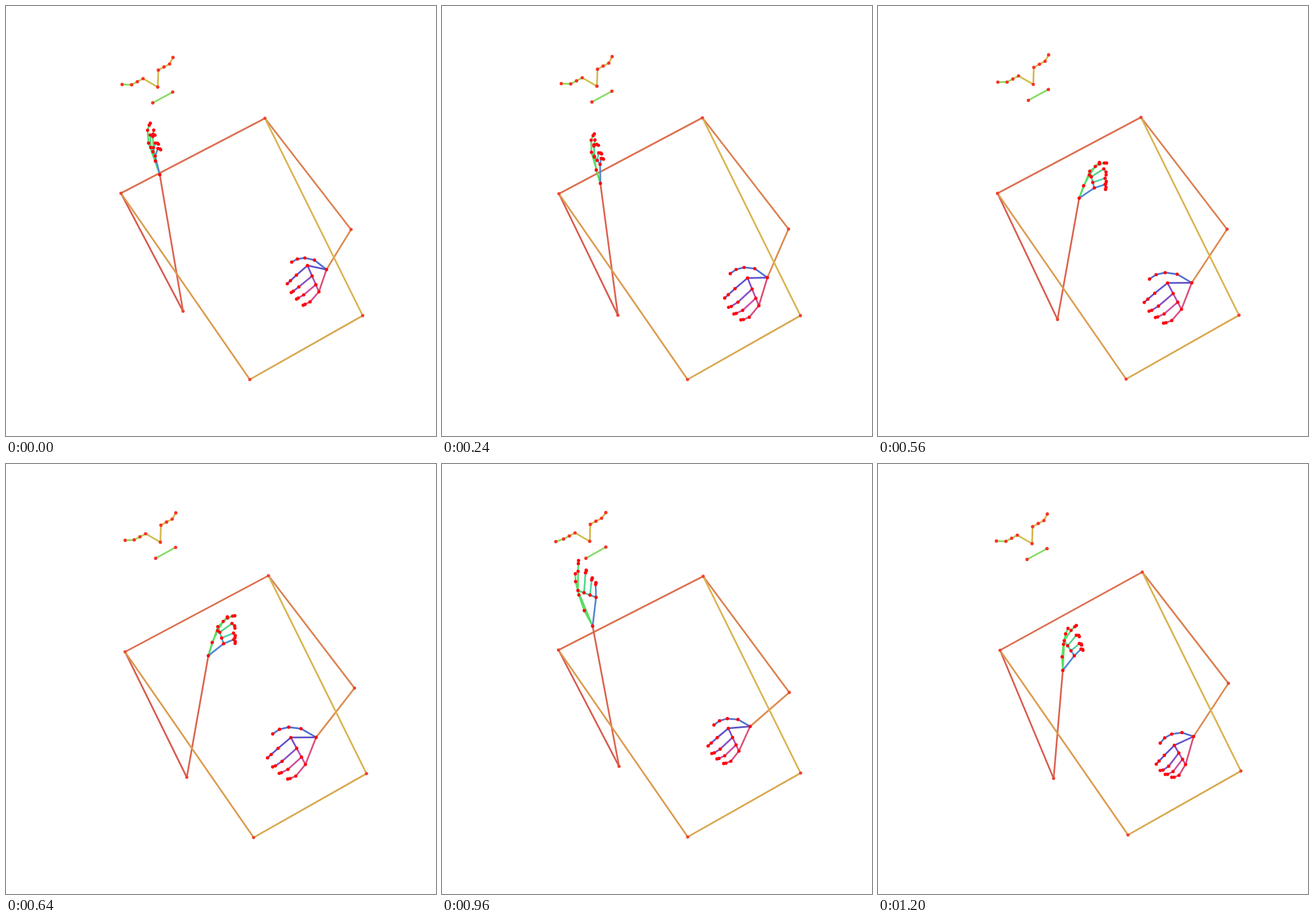
Write an HTML page with a canvas that moves like this. It is 748 by 748 pixels and loops after 1280 ms.

```html
<!DOCTYPE html>
<html lang="en">
<head>
<meta charset="utf-8">
<title>Skeleton in motion</title>
<style>
  html, body { margin: 0; width: 100%; height: 100%; overflow: hidden; background: #fff; }
  canvas { display: block; width: 748px; height: 748px; }
</style>
</head>
<body>
<canvas id="stage" width="748" height="748"></canvas>
<script>
const ctx = document.getElementById('stage').getContext('2d');
const STEP = 80, STEPS = 16;
const KEYS = [0, 3, 5, 8, 10, 12, 15]; // steps at which the key points are given

// Driving points; every other joint follows from these.
const chest = [[325.2, 260.5], [328.2, 260.5], [333, 258.5], [331.8, 260.5], [328.5, 260.5], [328.5, 259.5], [336, 256]];
const tilt = [27.5, 27.9, 27.7, 28, 27.8, 27, 28.8];
const nose = [[264, 141], [269.5, 139.5], [271.5, 137], [268.5, 136], [262, 135], [257, 134.5], [268, 138.5]];
const lean = [0, 0, 0, 0.25, 0.7, 1, 0];

const leftArm = {
  elbow: [[308, 531], [306, 538], [308.5, 542], [314.5, 545], [320.5, 535], [308, 526], [305.5, 547]],
  wrist: [[267.5, 293.5], [275.5, 308.5], [325, 324.5], [352, 333.5], [307.5, 302.5], [262, 282], [321.5, 359]]
};
// hand points are relative to the wrist
const leftHand = {
  thumb: [[-10.5, -77.5], [-9.5, -75.5], [22, -58], [33, -67.5], [-13.5, -87.5], [-30, -91], [9, -73]],
  first: [[-19.5, -55], [-15.5, -54], [10, -43], [16.5, -50.5], [-14, -61.5], [-25.5, -62], [2.5, -51.5]],
  last: [[-8, -32.5], [-0.5, -33], [19.5, -18.5], [26.5, -21], [14.5, -41.5], [6, -50], [20, -25.5]],
  index: [[-16.5, -89.5], [-10.5, -86], [30.5, -56.5], [46, -69.5], [-4.5, -105.5], [-24.5, -114], [23.5, -78]],
  pinky: [[1.5, -43.5], [5.5, -42], [33.5, -16.5], [46.5, -21.5], [23.5, -62], [6, -75], [35, -35]],
  curl: [0.35, 0.38, 0.5, 0.34, 0.05, 0.03, 0.2]
};
const rightWrist = [[557.5, 458.5], [566, 472.5], [558.5, 488], [539.5, 475.5], [530, 459], [536, 456.5], [549, 474]];
const rightHand = {
  thumb: [[-60.5, -13], [-64.5, -7], [-67.5, -6], [-75.5, -6], [-72.5, -0.5], [-63, -2.5], [-58, 11.5]],
  pinky: [[-40.5, 62], [-46, 73.5], [-47.5, 66], [-49.5, 72.5], [-49, 72.5], [-46, 64.5], [-38, 71]],
  push: [[2.3, -3], [3.4, 0.9], [2.3, 1.5], [0, 0], [-1.2, 0.5], [-1, 1.5], [0.3, 5.5]]
};

const LEFT = {
  fingers: ['#5cdc60', '#58da6a', '#50d68a', '#50d2a4', '#5090d0'],
  palm: ['#5cdc68', '#54d884', '#50d0a4', '#50a4cc', '#5488d4']
};
const RIGHT = {
  fingers: ['#5070d0', '#6250cc', '#8850c4', '#cc50a4', '#d85088'],
  palm: ['#5c54cc', '#7c50c8', '#b450b4', '#d05098', '#dc5078']
};

// smooth curve through key values
function curve(keys, step) {
  let i = 0;
  while (i < KEYS.length - 2 && step >= KEYS[i + 1]) i++;
  const span = KEYS[i + 1] - KEYS[i], u = (step - KEYS[i]) / span;
  const slope = k => {
    const a = Math.max(k - 1, 0), b = Math.min(k + 1, KEYS.length - 1);
    return (keys[b] - keys[a]) / (KEYS[b] - KEYS[a]) * span;
  };
  const p = keys[i], q = keys[i + 1], m = slope(i), n = slope(i + 1);
  return p + u * (m + u * (3 * (q - p) - 2 * m - n + u * (2 * (p - q) + m + n)));
}

const path = (keys, step) => [0, 1].map(c => curve(keys.map(k => k[c]), step));
const add = (p, x, y) => [p[0] + x, p[1] + y];
const mix = (p, q, a, b) => [a * p[0] + b * q[0], a * p[1] + b * q[1]];

// point at u along a-b, pushed sideways by v
function along(a, b, u, v = 0) {
  const dx = b[0] - a[0], dy = b[1] - a[1];
  return [a[0] + u * dx - v * dy, a[1] + u * dy + v * dx];
}

const bend = (a, b, u1, v1, u2, v2) => [a, along(a, b, u1, v1), along(a, b, u2, v2), b];

function line(a, b, color) {
  ctx.strokeStyle = color;
  ctx.beginPath();
  ctx.moveTo(...a);
  ctx.lineTo(...b);
  ctx.stroke();
}

function chain(points, colors) {
  for (let i = 1; i < points.length; i++) {
    line(points[i - 1], points[i], Array.isArray(colors) ? colors[i - 1] : colors);
  }
}

function dots(points, color, r) {
  ctx.fillStyle = color;
  for (const [x, y] of points) {
    ctx.beginPath();
    ctx.arc(x, y, r, 0, 2 * Math.PI);
    ctx.fill();
  }
}

function drawBody(mid, angle, sag, elbowL, wristL, wristR) {
  const x = 141.2 * Math.cos(angle), y = 141.2 * Math.sin(angle);
  const shoulderL = add(mid, -x, y), shoulderR = add(mid, x, -y);
  const hipL = add(mid, 98.9, 389.2), hipR = add(mid, 295.3, 278.1);
  const elbowR = add(shoulderR, 149.8, 193.5 + 8.5 * sag);
  line(shoulderL, shoulderR, '#dc7050');
  chain([shoulderL, elbowL, wristL], ['#d95c50', '#dc6450']);
  chain([shoulderR, elbowR, wristR], ['#dc8050', '#dc8c50']);
  chain([shoulderL, hipL, hipR, shoulderR], ['#dc9c50', '#d9a850', '#d9b450']);
  dots([shoulderL, shoulderR, elbowL, elbowR, hipL, hipR], '#f04434', 2.8);
}

function drawFace(n, turn) {
  const earL = add(n, -62 + 3 * turn, -4.5 + 5 * turn);
  const earR = add(n, 26.5 + 1.5 * turn, -51.5 + 1.5 * turn);
  const lipL = add(n, -8.7 + 2 * turn, 27.5 + 2 * turn);
  const lipR = add(n, 26 + 2 * turn, 8.7 + 1.3 * turn);
  const eyeL = [add(n, -45.5, -4), add(n, -35.5, -9.3), add(n, -25.6, -14.7)];
  const eyeR = [add(n, 1, -29.5), add(n, 10.8, -35), add(n, 20.6, -40.2)];
  const points = [earL, ...eyeL, n, ...eyeR, earR];
  chain(points, ['#88dc58', '#94da54', '#b0cc50', '#ccbf4c',
    '#d4b84c', '#d9b84c', '#d9b84c', '#d9b44c']);
  line(lipL, lipR, '#84dc60');
  dots([...points, lipL, lipR], '#f83428', 2.9);
}

function drawHand(wrist, fingers, look) {
  const joints = fingers.map(f => f.map(p => add(p, ...wrist)));
  const knuckles = joints.slice(1).map(f => f[0]);
  joints.forEach((f, i) => chain(f, look.fingers[i]));
  line(wrist, joints[0][0], look.fingers[0]);
  chain([wrist, ...knuckles, wrist], look.palm);
  dots([wrist, ...joints.flat()], '#ff0810', 2.9);
}

// knuckles and tips are spread evenly between the outer fingers
function leftFingers(step) {
  const { curl, ...ends } = leftHand;
  const [thumb, first, last, index, pinky] = Object.values(ends).map(k => path(k, step));
  const c = curve(curl, step);
  const finger = (knuckle, tip) =>
    bend(along(first, last, knuckle), along(index, pinky, tip), 0.9, -c, 1.02, -0.45 * c);
  return [
    bend([0, 0], thumb, 0.315, -0.055, 0.615, -0.06).slice(1, 3)
      .concat([along([0, 0], thumb, 0.865, -0.04), thumb]),
    bend(first, index, 0.64, -0.3 * c, 0.9, -0.13 * c),
    finger(1 / 3, 0.45),
    finger(2 / 3, 0.79),
    finger(1, 1)
  ];
}

// one hand shape, skewed to follow the thumb and little finger;
// pushing the knuckles out bends the fingers
function rightFingers(step) {
  const [thumb, pinky, push] = Object.values(rightHand).map(k => path(k, step));
  const at = (a, b) => mix(thumb, pinky, a, b);
  const first = add(at(0.55, 0.05), ...push), last = add(at(-0.17, 0.635), ...push);
  const c = 0.045 + 0.011 * push[1];
  return [
    bend(at(0.46, -0.17), thumb, 0.41, 0.13, 0.74, 0.115),
    bend(first, at(0.755, 0.555), 0.54, 0.01, 0.84, 0.005),
    bend(along(first, last, 0.4), at(0.51, 0.75), 0.645, -c, 0.91, -0.6 * c),
    bend(along(first, last, 0.73), at(0.27, 0.885), 0.66, -c - 0.025, 0.92, -0.6 * c),
    bend(last, pinky, 0.645, -c - 0.08, 0.905, -0.6 * c - 0.02)
  ];
}

function draw(step) {
  ctx.fillStyle = '#fff';
  ctx.fillRect(0, 0, 748, 748);
  ctx.lineWidth = 3;
  ctx.lineCap = 'round';
  const sag = curve(lean, step), angle = curve(tilt, step) * Math.PI / 180;
  const wristL = path(leftArm.wrist, step), wristR = path(rightWrist, step);
  drawBody(path(chest, step), angle, sag, path(leftArm.elbow, step), wristL, wristR);
  drawFace(path(nose, step), sag);
  drawHand(wristL, leftFingers(step), LEFT);
  drawHand(wristR, rightFingers(step), RIGHT);
}

let start;
function tick(now) {
  start ??= now;
  draw(Math.floor(Math.max(0, now - start) / STEP) % STEPS);
  requestAnimationFrame(tick);
}
draw(0);
requestAnimationFrame(tick);
</script>
</body>
</html>
```
